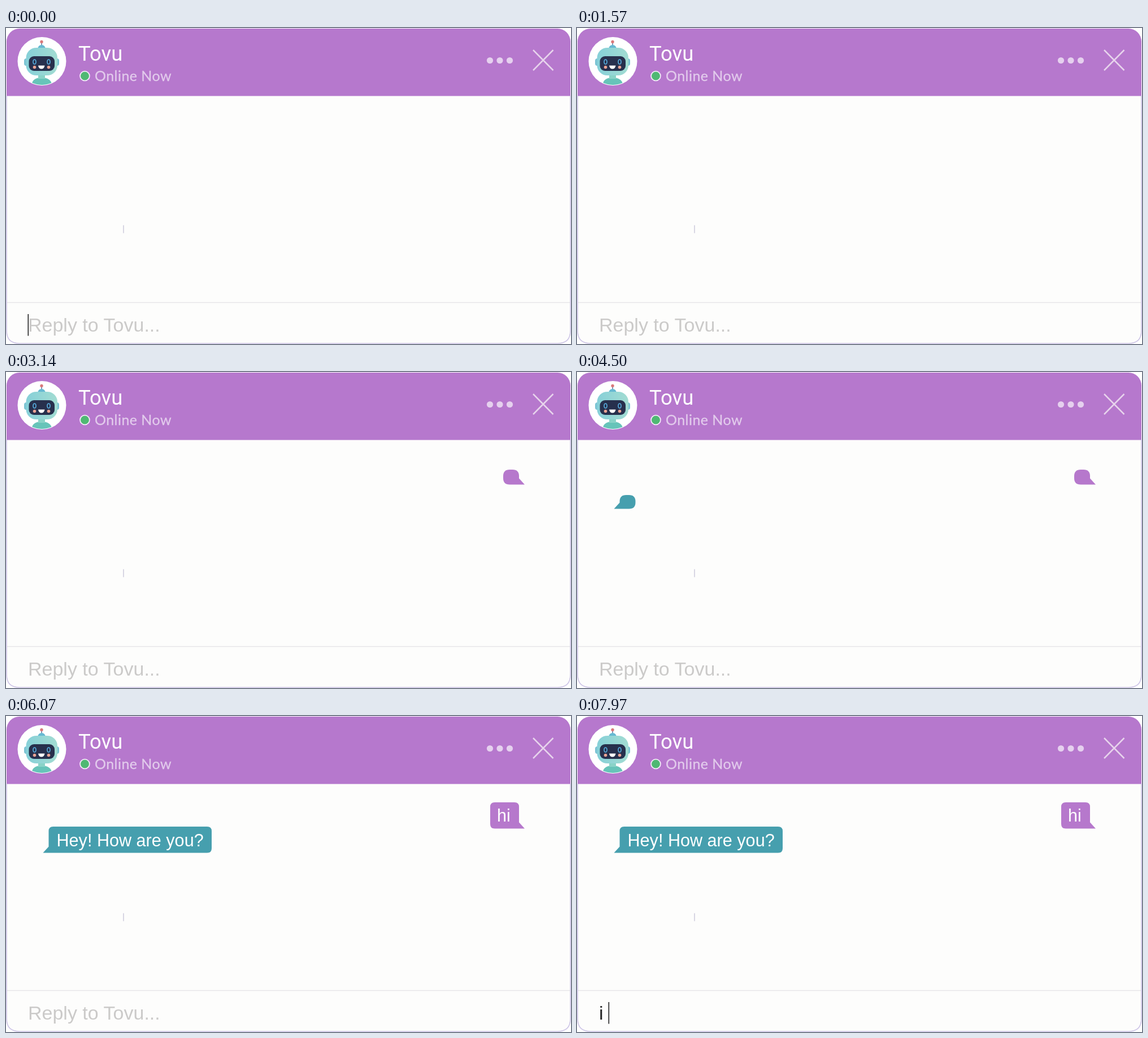
These frames come from a looping animation (1000x560 px, 8 s). An HTML page:

```html
<!DOCTYPE html>
<html lang="en">
<head>
<meta charset="utf-8">
<title>Chat window</title>
<style>
  html, body { margin: 0; width: 100%; height: 100%; overflow: hidden; background: #fff; }
  svg { display: block; width: 100vw; height: 100vh; }
  text { font-family: "Liberation Sans", Arial, sans-serif; white-space: pre; }
  .title { font: 36.5px Roboto, sans-serif; fill: #fff; }
  .status { font: 25px Lato, sans-serif; letter-spacing: .45px; fill: #e2cbec; stroke: #e2cbec; stroke-width: .3px; }
  .message { font-size: 30.6px; fill: #fff; }
  .entry { font-size: 34px; }
</style>
</head>
<body>
<svg viewBox="0 0 1000 560" preserveAspectRatio="none">
  <defs>
    <clipPath id="card"><rect x="1" y="1" width="998" height="558" rx="23"/></clipPath>
    <clipPath id="face"><circle cx="63.5" cy="59" r="42"/></clipPath>
    <linearGradient id="skin">
      <stop offset="0" stop-color="#86d0d8"/>
      <stop offset="1" stop-color="#a2dcd2"/>
    </linearGradient>
  </defs>

  <g clip-path="url(#card)">
    <rect width="1000" height="560" fill="#fdfdfc"/>
    <rect width="1000" height="120.5" fill="#b678cd"/>
    <path d="M2 486.5H998" stroke="#e6e5e8" stroke-width="1.5"/>
  </g>
  <path d="M1 120V536Q1 559 24 559H976Q999 559 999 536V120" fill="none" stroke="#cdc4e6" stroke-width="1.6"/>

  <circle cx="63.5" cy="59" r="43" fill="#fff"/>
  <g clip-path="url(#face)">
    <path d="M45 102Q46 88 63 88T82 102Z" fill="#67c4b9"/>
    <rect x="57" y="82" width="12" height="8" fill="#8ad3c8"/>
    <path d="M63 26V33" stroke="#718db0" stroke-width="1.8"/>
    <circle cx="63" cy="24.5" r="2.7" fill="#d9787a"/>
    <path d="M56 37Q57 30 63 30T70 37Z" fill="#66b9d2"/>
    <rect x="32" y="54" width="62" height="13" rx="4" fill="#7cc4d4"/>
    <rect x="35.5" y="35" width="55.5" height="49" rx="18" fill="url(#skin)"/>
    <rect x="40.5" y="50" width="45.5" height="26" rx="9" fill="#27304d"/>
    <g fill="none" stroke="#58afe0" stroke-width="1.6">
      <ellipse cx="50.5" cy="60" rx="2.5" ry="4"/>
      <ellipse cx="75.5" cy="60" rx="2.5" ry="4"/>
    </g>
    <g fill="#e8a294">
      <circle cx="50.5" cy="69.5" r="2.8"/>
      <circle cx="75.5" cy="69.5" r="2.8"/>
    </g>
    <path d="M57 66.5H68.5Q67.5 72.5 62.7 72.5T57 66.5Z" fill="#fff"/>
  </g>

  <text class="title" x="128" y="58">Tovu</text>
  <circle cx="139.5" cy="85" r="8.4" fill="#4fb873" stroke="#f5eafa" stroke-width="1.8"/>
  <text class="status" x="157" y="94">Online Now</text>
  <g fill="#e5d0ee">
    <circle cx="856.5" cy="57.5" r="5.6"/>
    <circle cx="874" cy="57.5" r="5.6"/>
    <circle cx="891.5" cy="57.5" r="5.6"/>
  </g>
  <path d="M933 39L968.5 75M968.5 39L933 75" stroke="#e7d3ec" stroke-width="2.5"/>
  <path d="M208 349.5V363.5" stroke="#d4d2e0" stroke-width="1.8"/>

  <g id="sent">
    <path id="sentShape" fill="#b678cc"/>
    <text id="sentText" class="message" x="869" y="186.5">hi</text>
  </g>
  <g id="answer">
    <path id="answerShape" fill="#469fae"/>
    <text id="answerText" class="message" x="89.5" y="231">Hey! How are you?</text>
  </g>

  <text id="hint" class="entry" x="39" y="538" fill="#cbcac9">Reply to Tovu...</text>
  <text id="typed" class="entry" x="39" y="538" fill="#222"></text>
  <rect id="caret" x="38.5" y="507" width="1.6" height="38.5" fill="#222"/>
</svg>

<script>
const LOOP = 8000, BLINK = 600;
const SENT = 2520, ANSWER = 3850, FILL = 4950;
const typing = [[0, ""], [1900, "h"], [2160, "hi"], [SENT, ""], [7740, "i"], [7970, "i "]];
const advance = { h: 18.9, i: 7.55, " ": 9.45 };
const $ = id => document.getElementById(id);
const show = (id, on) => $(id).setAttribute("visibility", on ? "visible" : "hidden");

// Rounded bubble with a pointed tail on its lower left or lower right.
function bubble(left, right, top, bottom, r, tailRight) {
  const s = tailRight ? 1 : -1;
  const near = tailRight ? right : left, far = tailRight ? left : right;
  return `M${far + s * r} ${top}H${near - s * r}Q${near} ${top} ${near} ${top + r}` +
    `V${bottom - 11}L${near + s * 10} ${bottom}H${far + s * r}` +
    `Q${far} ${bottom} ${far} ${bottom - r}V${top + r}Q${far} ${top} ${far + s * r} ${top}Z`;
}

function caretOn(t) {
  if (t < 1900) return t < 120 || (t >= 720 && t < 1320);
  if (t < SENT || t >= 7740) return true;
  return Math.floor((t - SENT) / BLINK) % 2 === 0;
}

function draw(t) {
  const text = typing.filter(step => step[0] <= t).pop()[1];
  const full = t >= FILL, r = full ? 8 : 11.5;
  show("sent", t >= SENT + 40);
  show("answer", t >= ANSWER);
  $("sentText").style.display = $("answerText").style.display = full ? "" : "none";
  $("sentShape").setAttribute("d", bubble(full ? 857 : 880, 908, full ? 153 : 173, 199.5, r, true));
  $("answerShape").setAttribute("d", bubble(75.5, full ? 364 : 103.5, full ? 196 : 218, 242.5, r, false));
  $("typed").textContent = text;
  show("hint", !text);
  $("caret").setAttribute("x", 38.5 + [...text].reduce((x, c) => x + advance[c], 0));
  show("caret", caretOn(t));
}

const start = performance.now();
function frame() {
  draw((performance.now() - start) % LOOP);
  requestAnimationFrame(frame);
}
frame();
</script>
</body>
</html>
```
